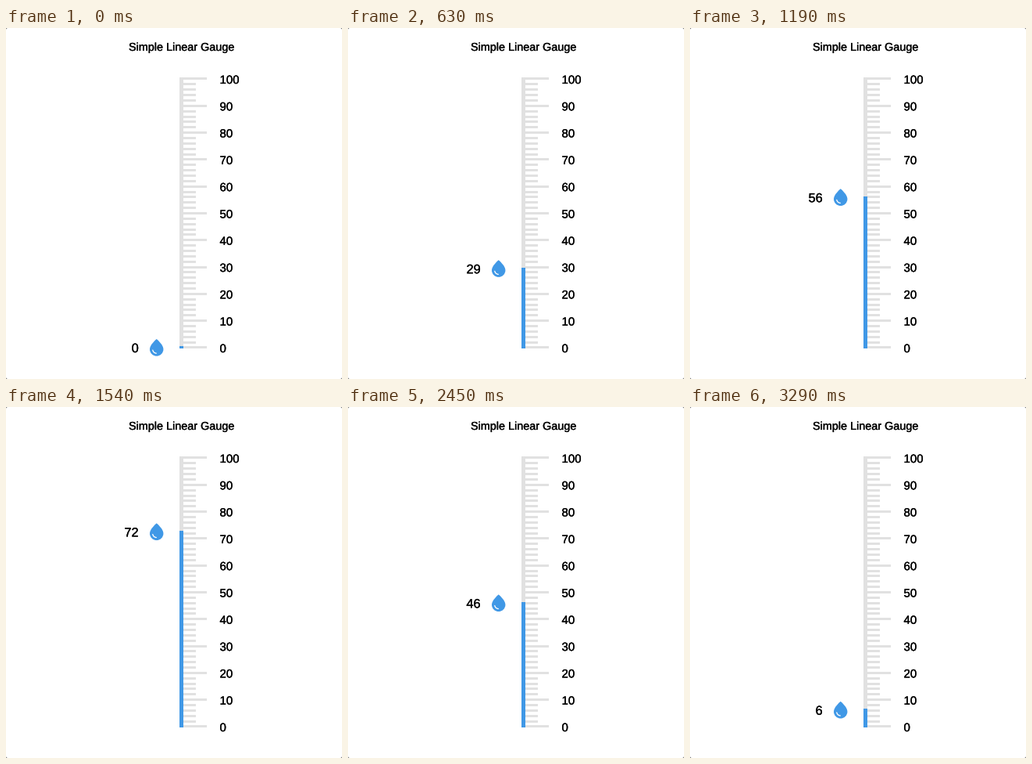
These frames come from a looping animation (430 px wide and 448 px high, 3360 ms). A matplotlib script:

```python
import matplotlib.pyplot as plt
from matplotlib.animation import FuncAnimation
from matplotlib.patches import Arc, FancyBboxPatch, PathPatch, Rectangle
from matplotlib.path import Path
from matplotlib.patheffects import withStroke
from matplotlib.transforms import Affine2D

W, H, DPI = 430, 448, 100
FRAMES, INTERVAL = 48, 70
PX = 72 / DPI

GREY, BLUE = "#e1e1e1", "#4098e6"
ZERO_Y, UNIT = 408, 3.43
TRACK_X, TRACK_W, TICK_W = 222, 5.4, 3
DROP_X = 192.7
PEAK = 76


def y_of(value):
    return ZERO_Y - UNIT * value


def value_at(frame):
    """Constant climb to the peak, then the same steps backwards."""
    step = min(frame, FRAMES + 1 - frame)
    return min(PEAK, max(0, 3.315 * step - 0.45))


fig = plt.figure(figsize=(W / DPI, H / DPI), dpi=DPI, facecolor="#707070")
ax = fig.add_axes([0, 0, 1, 1])
ax.set_xlim(0, W)
ax.set_ylim(H, 0)
ax.axis("off")


def rect(x, y, w, h, color, z=1):
    return ax.add_patch(Rectangle((x, y), w, h, fc=color, lw=0, zorder=z))


def label(x, y, text, size=14.4, ha="left"):
    # A hairline stroke gives the type a slightly heavier weight
    return ax.text(x, y, text, fontsize=size * PX, family="Liberation Sans",
                   color="black", ha=ha, va="baseline", zorder=4,
                   path_effects=[withStroke(linewidth=0.3 * PX,
                                            foreground="black")])


ax.add_patch(FancyBboxPatch((0, 0), W, H, fc="white", lw=0, zorder=0,
                            boxstyle="round,pad=0,rounding_size=2.5"))
label(224.7, 29, "Simple Linear Gauge", ha="center")

# Scale
base = ZERO_Y + TICK_W / 2
top = y_of(100) - TICK_W / 2
rect(TRACK_X, top, TRACK_W, base - top, GREY)
for v in range(0, 101, 2):
    major = v % 10 == 0
    end = 257 if major else 243
    rect(TRACK_X, y_of(v) - TICK_W / 2, end - TRACK_X, TICK_W, GREY)
    if major:
        label(273.5, y_of(v) + 6, str(v), size=15)

bar = rect(TRACK_X, base, TRACK_W, 0, BLUE, z=2)

# Water drop, drawn around its own origin
outline = Path(
    [(0, -11), (2.2, -9.2), (8.7, -3.4), (8.7, 2.1),
     (8.7, 6.9), (4.8, 10.7), (0, 10.7),
     (-4.8, 10.7), (-8.7, 6.9), (-8.7, 2.1),
     (-8.7, -3.4), (-2.2, -9.2), (0, -11)],
    [Path.MOVETO] + [Path.CURVE4] * 12)
drop = ax.add_patch(PathPatch(outline, fc=BLUE, lw=0, zorder=3))
shine = ax.add_patch(Arc((DROP_X, 0), 10, 10, theta1=94, theta2=170,
                         color="white", lw=1.3 * PX, capstyle="round",
                         zorder=4))
readout = label(169.7, 0, "", size=16.3, ha="right")


def update(frame):
    value = value_at(frame)
    y = y_of(value)
    bar.set_height(y - TICK_W / 2 - base)
    drop.set_transform(Affine2D().translate(DROP_X, y) + ax.transData)
    shine.set_center((DROP_X, y + 2.2))
    readout.set_text(str(round(value)))
    readout.set_y(y + 6)
    return bar, drop, shine, readout


anim = FuncAnimation(fig, update, frames=FRAMES, interval=INTERVAL,
                     repeat=True, repeat_delay=0, blit=False)
plt.show()
```
